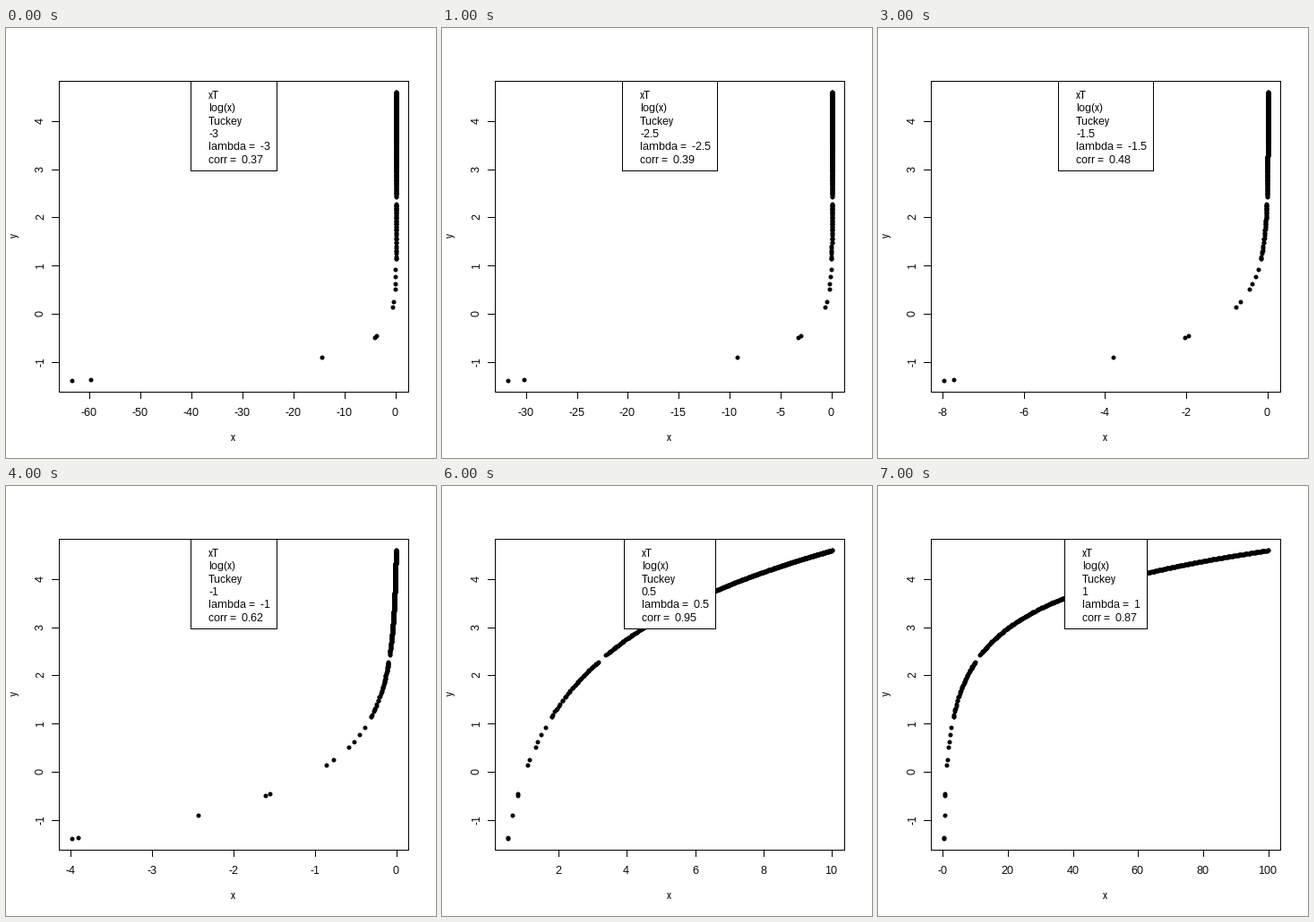
Write a matplotlib script that moves like this. It is 480 by 480 pixels and loops after 8000 ms.

```python
import matplotlib.pyplot as plt
import numpy as np
from matplotlib.animation import FuncAnimation
from matplotlib.patches import Rectangle
from matplotlib.path import Path

SIZE = 480
LEFT, RIGHT, TOP, BOTTOM = 59.04, 449.76, 59.04, 406.56
MID_X, MID_Y = (LEFT + RIGHT) / 2, (TOP + BOTTOM) / 2
LINE = 14.4          # height of one text line in pixels

plt.rcParams.update({
    "font.family": "Liberation Sans",
    "font.size": 12,
    "text.hinting": "native",
    "text.hinting_factor": 1,
})

lambdas = [v for v in np.arange(-3, 1.5, 0.5) if v != 0]

# A few isolated low values, then uniform noise up to 100.
rng = np.random.default_rng(4)
low = np.exp([-1.384, -1.364, -0.893, -0.48, -0.446, 0.15, 0.255,
              0.525, 0.635, 0.785, 0.935])
middle = np.linspace(3, 9.9, 45) + rng.uniform(-0.2, 0.2, 45)
high = np.linspace(11.45, 99.8, 444) + rng.uniform(-0.15, 0.15, 444)
values = np.concatenate([low, middle, high])
logs = np.log(values)

# Five-pixel disc centred on a pixel instead of on a pixel corner.
DOT = Path.circle((0.2, -0.2), 1)
DOT_SIZE = 6

fig = plt.figure(figsize=(SIZE / 72, SIZE / 72), dpi=72, facecolor="white")
ax = fig.add_axes([0, 0, 1, 1])


def limits(data):
    pad = 0.04 * np.ptp(data)
    return data.min() - pad, data.max() + pad


def to_pixel(v, lims, start, end):
    lo, hi = lims
    return (start + (v - lo) / (hi - lo) * (end - start)).astype(int)


def pretty_ticks(lims):
    """Round tick values, about five steps over the range."""
    lo, hi = lims
    cell = (hi - lo) / 5
    base = step = 10 ** np.floor(np.log10(cell))
    for factor, bias in ((2, 1.5), (5, 2.75), (10, 1.5)):
        if factor * base - cell < bias * (cell - step):
            step = factor * base
    ticks = np.arange(np.ceil(lo / step), np.floor(hi / step) + 1) * step
    fmt = "{:.1f}" if step < 1 else "{:g}"
    return ticks, [fmt.format(t) for t in ticks]


def line(xs, ys):
    ax.plot(xs, ys, color="black", lw=1, antialiased=False, snap=False,
            solid_capstyle="butt")


def box(x0, y0, x1, y1, fill):
    ax.add_patch(Rectangle((x0 + 0.5, y0 + 0.5), x1 - x0, y1 - y0, fc=fill,
                           ec="black", lw=1, antialiased=False, snap=False,
                           zorder=3))


def label(x, y, s, ha="center"):
    ax.text(x - 1, y, s, ha=ha, va="baseline", zorder=4)


def side_label(x, y, s):
    ax.text(x, y - 1, s, ha="center", va="baseline", rotation=90,
            rotation_mode="anchor", zorder=4)


def draw_axes(x_lims, y_lims):
    ticks, names = pretty_ticks(x_lims)
    for x, name in zip(to_pixel(ticks, x_lims, LEFT, RIGHT), names):
        line([x + 0.5, x + 0.5], [406, 414])
        label(x + 0.5, 433, name)
    ticks, names = pretty_ticks(y_lims)
    for y, name in zip(to_pixel(ticks, y_lims, BOTTOM, TOP), names):
        line([51, 60], [y + 0.5, y + 0.5])
        side_label(42, y + 0.5, name)
    label(MID_X, 461, "x")
    side_label(13, MID_Y, "y")
    box(59, 59, 449, 406, "none")


def draw_legend(lam, corr):
    name = f"{lam:g}"
    width = 92 + 4 * (lam < 0) + 10 * ("." in name)
    x0 = int(MID_X - width / 2)
    box(x0, 59, x0 + width, 159, "white")
    rows = ["xT", "log(x)", "Tuckey", name,
            f"lambda =  {name}", f"corr =  {corr:.2f}"]
    for i, row in enumerate(rows):
        label(x0 + 21, round(78.9 + LINE * i), row, ha="left")


def draw(frame):
    lam = lambdas[frame]
    ax.clear()
    ax.set(xlim=(0, SIZE), ylim=(SIZE, 0))
    ax.axis("off")

    powers = np.sign(lam) * values ** lam
    x_lims, y_lims = limits(powers), limits(logs)
    ax.plot(to_pixel(powers, x_lims, LEFT, RIGHT),
            to_pixel(logs, y_lims, BOTTOM, TOP), ls="none", marker=DOT,
            ms=DOT_SIZE, mew=0, color="black", antialiased=False)
    draw_axes(x_lims, y_lims)
    draw_legend(lam, np.corrcoef(powers, logs)[0, 1])
    return []


anim = FuncAnimation(fig, draw, frames=len(lambdas), interval=1000,
                     repeat=True, repeat_delay=0, blit=False)
plt.show()
```
